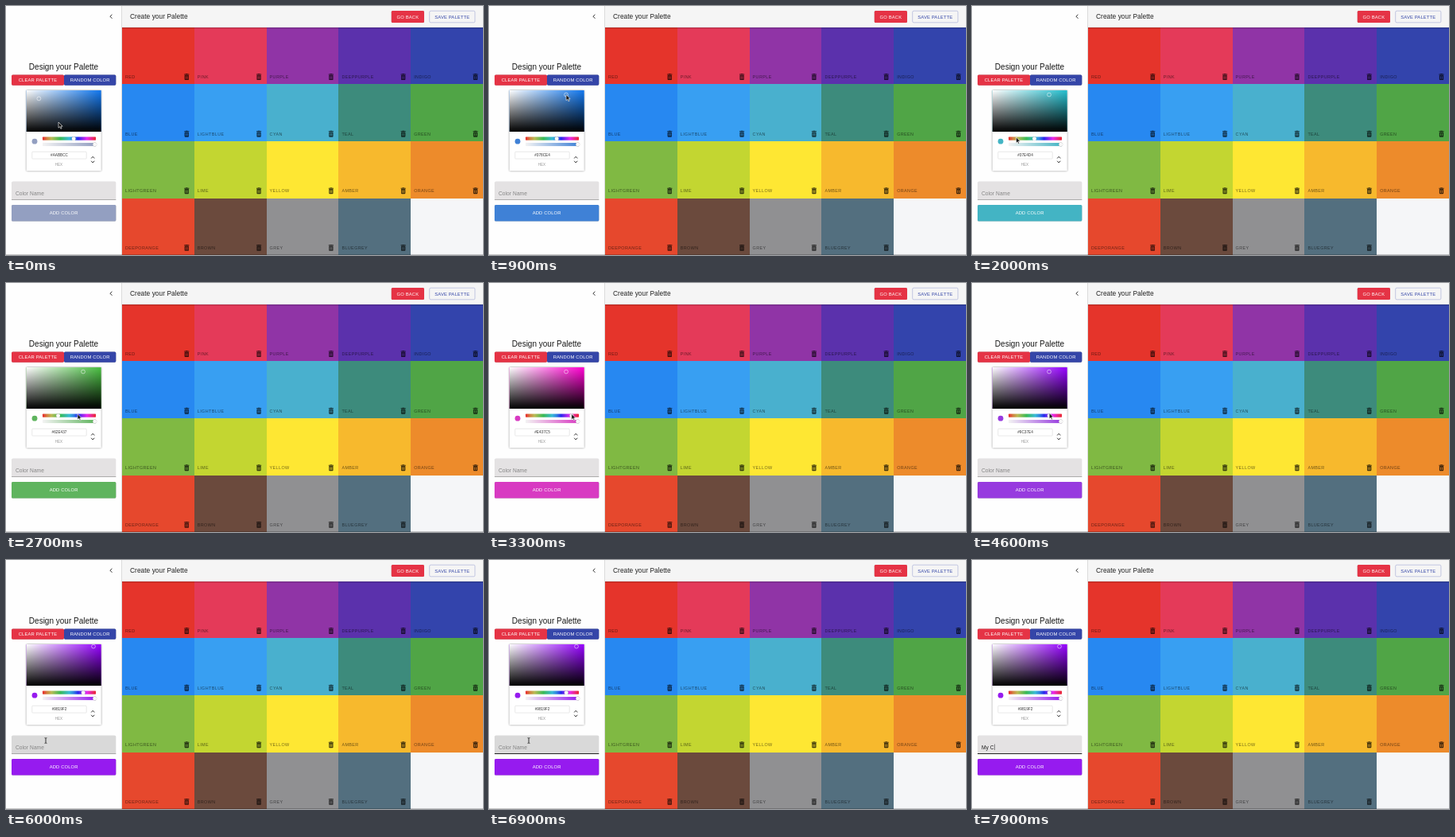
Animation, 600 px wide and 313 px high, one loop 8000 ms. Source, as an HTML page:

```html
<!DOCTYPE html>
<html lang="en">
<head>
<meta charset="utf-8">
<title>Palette editor</title>
<style>
  html, body { margin: 0; width: 100%; height: 100%; overflow: hidden; background: #fefefe; }
  svg { display: block; width: 100vw; height: 100vh; }
  text { font-family: "Liberation Sans", Arial, sans-serif; white-space: pre; }
  .button { font-size: 5.8px; letter-spacing: .0286em; text-anchor: middle; fill: #fff; }
  .label { font-size: 5.4px; letter-spacing: .415px; fill: #000; fill-opacity: .55; }
  .raised { filter: drop-shadow(0 .7px .7px rgba(0,0,0,.35)); }
  .knob { fill: #f8f8f8; filter: drop-shadow(0 .4px .5px rgba(0,0,0,.5)); }
  .line { fill: none; stroke: #333; stroke-width: 1; }
</style>
</head>
<body>
<svg viewBox="0 0 600 313">
  <defs>
    <linearGradient id="white"><stop stop-color="#fff"/><stop offset="1" stop-color="#fff" stop-opacity="0"/></linearGradient>
    <linearGradient id="black" x2="0" y2="1"><stop stop-opacity="0"/><stop offset="1"/></linearGradient>
    <linearGradient id="hues"></linearGradient>
    <linearGradient id="alpha"><stop class="tint" stop-opacity="0"/><stop class="tint" offset="1"/></linearGradient>
    <linearGradient id="shade" x2="0" y2="1"><stop stop-opacity=".25"/><stop offset="1" stop-opacity="0"/></linearGradient>
    <path id="trash" d="M6 19q0 2 2 2h8q2 0 2-2V7H6zM19 4h-3.5l-1-1h-5l-1 1H5v2h14zM9 10h1.6v8H9zM13.4 10H15v8h-1.6z" fill-rule="evenodd"/>
  </defs>

  <rect width="600" height="313" fill="#fefefe"/>
  <rect x="145" width="455" height="313" fill="#f5f6f8"/>
  <g id="cells"></g>
  <rect x="146" y="26.5" width="454" height="3" fill="url(#shade)"/>
  <rect x="146" width="454" height="26.5" fill="#f5f5f5"/>
  <rect x="145" width="1" height="313" fill="#dcdcdc"/>

  <text x="156" y="16" font-size="8.3" letter-spacing=".062" fill="#222">Create your Palette</text>
  <path class="line" d="M133.4 10.7L131 13.2l2.4 2.5"/>
  <text x="72.5" y="79.7" font-size="10" text-anchor="middle" fill="#181818">Design your Palette</text>
  <g id="buttons"></g>

  <rect x="25.7" y="106" width="94" height="101.2" rx=".8" fill="#fff" style="filter:drop-shadow(0 .6px 1.3px rgba(0,0,0,.45))"/>
  <g id="pad"></g>
  <circle id="spot" r="2.4" fill="none" stroke="#fff" stroke-opacity=".85" stroke-width=".6"/>
  <circle class="fill" cx="36" cy="170.2" r="3.4"/>
  <rect x="46" y="164.6" width="67" height="4.1" rx=".6" fill="url(#hues)"/>
  <rect x="46" y="172" width="67" height="4.1" fill="#f3f3f3"/>
  <rect x="46" y="172" width="67" height="4.1" fill="url(#alpha)"/>
  <circle id="hueKnob" class="knob" cy="166.7" r="2.5"/>
  <circle class="knob" cx="111.7" cy="174" r="2.5"/>
  <rect x="32.8" y="183.2" width="68.4" height="8.9" rx=".8" fill="#fff" stroke="#d8d8d8" stroke-width=".6"/>
  <text id="hex" x="67" y="189.3" font-size="4.7" text-anchor="middle" fill="#333"></text>
  <text x="66.3" y="200.9" font-size="4.5" text-anchor="middle" fill="#969696">HEX</text>
  <path class="line" d="M107.2 191.5l2-2.2 2 2.2M107.2 194.8l2 2.2 2-2.2"/>

  <path id="field" d="M7 244V222.2q0-1.7 1.7-1.7H136.6q1.7 0 1.7 1.7V244z"/>
  <rect id="underline" x="7" width="131.3"/>
  <text id="entry" x="12" y="237.6" font-size="6.64" letter-spacing=".06"></text>
  <rect id="caret" y="231.5" width=".5" height="7.5" fill="#222"/>
  <rect y="312.4" width="600" height=".6" fill-opacity=".35"/>

  <path id="arrow" d="M0 0V7.2L1.7 5.7 2.9 8.3 4.1 7.8 2.9 5.2H5.2z" fill="#111" stroke="#fff" stroke-width=".6"/>
  <path id="beam" class="line" d="M-1.4-3.4Q0-3.4 0-2.6Q0-3.4 1.4-3.4M0-2.6V2.6M-1.4 3.4Q0 3.4 0 2.6Q0 3.4 1.4 3.4"/>
</svg>
<script>
const LOOP = 8000, STEP = 100, LAG = 300;
const FOCUS = 6300, TYPING = 6800, KEY_GAP = 270;
const PAD = { x: 25.7, y: 106, w: 94, h: 52 };
const HUE_BAR = { x: 46, w: 67 };

const $ = id => document.getElementById(id);
const set = (el, attrs) => Object.entries(attrs).forEach(([k, v]) => el.setAttribute(k, v));
const setAll = (selector, attrs) => document.querySelectorAll(selector).forEach(el => set(el, attrs));
const show = (el, on) => set(el, { visibility: on ? "visible" : "hidden" });
const clamp = v => Math.max(0, Math.min(1, v));
const ease = p => p * p * (3 - 2 * p);
const mix = (a, b, p) => a + (b - a) * p;

function hsv(h, s, v) {
  return [5, 3, 1].map(n => {
    const k = (n + h / 60) % 6;
    return 255 * (v - v * s * clamp(Math.min(k, 4 - k)));
  });
}
const toHex = rgb => "#" + rgb.map(c => Math.round(c).toString(16).padStart(2, "0")).join("").toUpperCase();

// Greenish tints are shown muted towards slate blue.
const muted = rgb => toHex(rgb.map((c, i) => mix(c, [90, 90, 165][i], .35 * rgb[1] / 228)));

function drawCells() {
  const palette = `RED e5342b,PINK e43a59,PURPLE 9034a6,DEEPPURPLE 5b31ac,INDIGO 3344ac,
    BLUE 2788f1,LIGHTBLUE 389ff2,CYAN 49b0ce,TEAL 3d8b7c,GREEN 50a546,
    LIGHTGREEN 80b943,LIME c3d631,YELLOW fee733,AMBER f7b92d,ORANGE ed8b2b,
    DEEPORANGE e6482d,BROWN 6b4a3d,GREY 909092,BLUEGREY 536f7f`;
  const w = 90.8, h = 71.6;
  $("cells").innerHTML = palette.split(",").map((entry, i) => {
    const [name, color] = entry.trim().split(" ");
    const x = 146 + (i % 5) * w, y = 26.8 + Math.floor(i / 5) * h;
    return `<rect x="${x}" y="${y}" width="${w}" height="${h}" fill="#${color}" shape-rendering="crispEdges"/>
      <text class="label" x="${x + 4}" y="${y + 64.3}">${name}</text>
      <use href="#trash" fill-opacity=".72" transform="translate(${x + 76} ${y + 57}) scale(.44)"/>`;
  }).join("");
}

function button(text, x, y, w, h, look, textColor = "#fff") {
  return `<rect x="${x}" y="${y}" width="${w}" height="${h}" rx="1.6" ${look}/>
    <text class="button" x="${x + w / 2}" y="${y + h / 2 + 2.1}" style="fill:${textColor}">${text}</text>`;
}

function drawControls() {
  const red = 'class="raised" fill="#e53345"', blue = 'class="raised" fill="#3445a8"';
  const outline = 'fill="none" stroke="#9fa7d3" stroke-width=".6"';
  $("buttons").innerHTML =
    button("GO BACK", 484.8, 6, 41.2, 15, red) +
    button("SAVE PALETTE", 532.7, 6.2, 57.2, 14.6, outline, "#3547a8") +
    button("CLEAR PALETTE", 7, 86.5, 66, 13.2, red) +
    button("RANDOM COLOR", 73, 86.5, 65.3, 13.2, blue) +
    button("ADD COLOR", 7, 250, 131.3, 20.6, 'class="raised fill"');
  $("pad").innerHTML = ['class="base"', 'fill="url(#white)"', 'fill="url(#black)"'].map(look =>
    `<rect x="${PAD.x}" y="${PAD.y}" width="${PAD.w}" height="${PAD.h}" ${look}/>`).join("");
  $("hues").innerHTML = Array.from({ length: 13 }, (_, i) =>
    `<stop offset="${i / 12}" stop-color="${muted(hsv(i * 30, .85, .95))}"/>`).join("");
}

// The pointer rests at each stop, then eases to the next.
const stops = [
  { at: 0, leave: 0, x: 66, y: 146 },
  { at: 500, leave: 1000, x: 97.03, y: 111.5 },
  { at: 1400, leave: 1600, x: 82.75, y: 165 },
  { at: 2000, leave: 2150, x: 55.5, y: 165 },
  { at: 3000, leave: 3400, x: 103.83, y: 164.5 },
  { at: 4200, leave: 4700, x: 97.2, y: 163.5 },
  { at: 5050, leave: 5300, x: 110, y: 108.65 },
  { at: 5900, leave: LOOP, x: 50, y: 227 }
];
const drags = [
  { on: "pad", from: 500, to: 1000 },
  { on: "hue", from: 1400, to: 4300 },
  { on: "pad", from: 5050, to: 5250 }
];

function pointer(t) {
  const i = stops.filter(stop => stop.at <= t).length - 1;
  const a = stops[i], b = stops[i + 1] || a;
  const p = b === a ? 0 : ease(clamp((t - a.leave) / (b.at - a.leave)));
  return { x: mix(a.x, b.x, p), y: mix(a.y, b.y, p) };
}

// The picker follows the dragging pointer with a delay.
function pickedColor(t) {
  let h = 210.5, s = 1 / 6, v = .8;
  for (const { on, from, to } of drags) {
    if (t - LAG < from) break;
    const { x, y } = pointer(Math.min(t - LAG, to));
    if (on === "hue") h = 360 * clamp((x - HUE_BAR.x) / HUE_BAR.w);
    else {
      s = clamp((x - PAD.x) / PAD.w);
      v = 1 - clamp((y - PAD.y) / PAD.h);
    }
  }
  return [h, s, v];
}

function drawPicker(t) {
  const [h, s, v] = pickedColor(t), rgb = hsv(h, s, v);
  setAll(".base", { fill: muted(hsv(h, 1, 1)) });
  setAll(".fill", { fill: muted(rgb) });
  setAll(".tint", { "stop-color": muted(rgb) });
  set($("spot"), { cx: PAD.x + PAD.w * s, cy: PAD.y + PAD.h * (1 - v) });
  set($("hueKnob"), { cx: HUE_BAR.x + HUE_BAR.w * h / 360 });
  $("hex").textContent = toHex(rgb);
}

function drawField(t) {
  const typed = "My Color".slice(0, Math.max(0, Math.floor((t - TYPING) / KEY_GAP)));
  const { x, y } = pointer(t);
  const over = y > 220, focused = t >= FOCUS;
  set($("field"), { fill: over && !typed ? "#d9d9d9" : "#e4e2e3" });
  set($("underline"), { y: focused ? 243 : 243.4, height: focused ? 1 : .6, fill: focused ? "#222" : "#888" });
  $("entry").textContent = typed || "Color Name";
  set($("entry"), { fill: typed ? "#222" : "#858585" });
  set($("caret"), { x: typed ? 12.3 + $("entry").getComputedTextLength() : 12 });
  show($("caret"), focused && (typed || (t - FOCUS) % 1000 < 500));
  show($("arrow"), !over);
  show($("beam"), over && !typed);
  for (const id of ["arrow", "beam"]) set($(id), { transform: `translate(${x} ${y})` });
}

drawCells();
drawControls();
const start = performance.now();
function tick() {
  const elapsed = (performance.now() - start) % LOOP;
  const t = Math.floor(elapsed / STEP) * STEP;
  drawPicker(t);
  drawField(t);
  requestAnimationFrame(tick);
}
tick();
</script>
</body>
</html>
```
